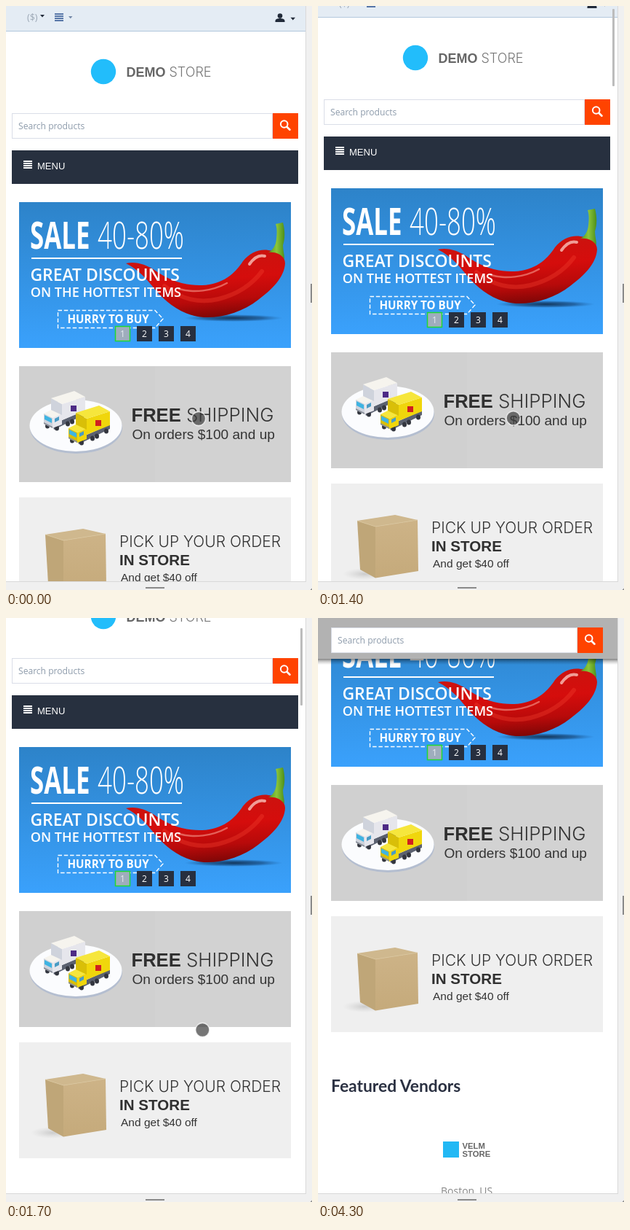
An HTML page for the animation above (6.1 s loop, 421 px wide and 801 px high).

```html
<!DOCTYPE html>
<html lang="en">
<head>
<meta charset="utf-8">
<title>Mobile store</title>
<style>
html, body { margin: 0; width: 100%; height: 100%; overflow: hidden; background: #f0f0f0; }
svg { display: block; width: 421px; height: 801px; }
text { white-space: pre; }
.open { font-family: "Open Sans", sans-serif; }
.arial { font-family: "Liberation Sans", Arial, sans-serif; }
.thin { font-family: Inter, sans-serif; font-weight: 300; }
.lato { font-family: Lato, sans-serif; }
.b { font-weight: 700; }
.sb { font-weight: 600; }
</style>
</head>
<body>
<svg viewBox="0 0 421 801">
  <defs>
    <clipPath id="screen"><rect width="412" height="789"/></clipPath>
    <clipPath id="pickClip"><rect x="18" y="674" width="374" height="159"/></clipPath>
    <linearGradient id="sky" x2="0" y2="1">
      <stop stop-color="#2d83c9"/><stop offset="1" stop-color="#3aa1fc"/>
    </linearGradient>
    <linearGradient id="red" x1=".4" y1="0" x2=".6" y2="1">
      <stop stop-color="#c9140f"/><stop offset=".45" stop-color="#d50d0c"/><stop offset=".75" stop-color="#b80a0a"/><stop offset="1" stop-color="#7c0606"/>
    </linearGradient>
    <linearGradient id="stem"><stop stop-color="#4f9a20"/><stop offset=".5" stop-color="#8cc63a"/><stop offset="1" stop-color="#4d8f1c"/></linearGradient>
    <linearGradient id="card" x2="0" y2="1"><stop stop-color="#cdb387"/><stop offset="1" stop-color="#c5aa7b"/></linearGradient>
    <radialGradient id="shade"><stop stop-color="#0c2440" stop-opacity=".85"/><stop offset=".6" stop-color="#123a66" stop-opacity=".55"/><stop offset="1" stop-color="#1b5c9c" stop-opacity="0"/></radialGradient>
    <radialGradient id="soft"><stop stop-color="#888" stop-opacity=".35"/><stop offset="1" stop-color="#aaa" stop-opacity="0"/></radialGradient>
    <linearGradient id="drop" x2="0" y2="1"><stop stop-color="#000" stop-opacity=".48"/><stop offset=".5" stop-color="#000" stop-opacity=".18"/><stop offset="1" stop-color="#000" stop-opacity="0"/></linearGradient>
  </defs>

  <rect width="421" height="801" fill="#f0f0f0"/>
  <rect width="413" height="790" fill="#d9d9d9"/>
  <rect width="412" height="789" fill="#fff"/>
  <g clip-path="url(#screen)">
    <g id="page">
      <!-- top bar -->
      <rect width="412" height="34" fill="#e4ecf4"/>
      <rect y="34" width="412" height="1" fill="#b3c8dd"/>
      <text class="open" x="29" y="20" font-size="12.5" fill="#9ba7b5">($)</text>
      <g id="topIcons"></g>
      <path d="M47 12h6l-3 3.5z M391.500 15.800h6.500l-3.250 3.600z" fill="#222b3a"/>
      <path d="M86 14h5.500l-2.750 3.200z" fill="#7388a8"/>
      <g fill="#222b3a"><circle cx="377" cy="13.600" r="3.300"/><path d="M370.500 22v-1.500c0-3 4-3.500 6.500-3.500s6.500.5 6.500 3.500v1.500z"/></g>
      <!-- logo -->
      <circle cx="134" cy="90" r="17.200" fill="#22bdfb"/>
      <text class="arial b" x="165.500" y="97" font-size="18" fill="#666">DEMO</text>
      <text class="thin" x="224.500" y="97" font-size="18" fill="#777">STORE</text>
      <g id="search"></g>
      <!-- menu -->
      <rect x="8" y="198" width="394" height="46" fill="#27303f"/>
      <g id="menuIcon"></g>
      <text class="arial" x="43" y="224" font-size="13" fill="#fff">MENU</text>
      <!-- sale -->
      <rect x="18" y="269" width="374" height="200" fill="url(#sky)"/>
      <ellipse cx="313" cy="428" rx="68" ry="5" fill="url(#shade)"/>
      <path d="M165 353C180 350 192 355 204 362C222 375 245 384 270 383C298 382 315 367 326 350C335 339 348 333 361 335C376 336 384 344 384 353C383 372 366 389 347 403C326 419 300 428 272 427C243 425 221 407 206 390C194 375 183 362 165 353Z" fill="url(#red)"/>
      <g fill="none" stroke-linecap="round">
        <path d="M218 384C240 402 266 408 292 402C320 395 340 380 352 364" stroke="#ee3a2c" stroke-width="6" opacity=".4"/>
        <path d="M335 354C342 344 349 341 356 343" stroke="#ffd8d0" stroke-width="4" opacity=".7"/>
        <path d="M238 388C258 394 284 391 304 380" stroke="#ffb5a8" stroke-width="2.500" opacity=".5"/>
      </g>
      <path d="M361 338C367 335 371 329 372 320C373 311 373 305 371 299L381 297C384 308 384 319 381 328C381 335 383 340 383 347C378 340 370 337 361 338Z" fill="url(#stem)"/>
      <g fill="#fff">
        <g transform="translate(33 333) scale(.67 1)" class="open" font-size="52">
          <text class="b">SALE</text><text x="139" font-weight="300">40-80%</text>
        </g>
        <rect x="35" y="345" width="207" height="2"/>
        <text class="open sb" x="33.500" y="377" font-size="22.900">GREAT DISCOUNTS</text>
        <text class="open sb" x="33.700" y="399" font-size="18.100">ON THE HOTTEST ITEMS</text>
        <text class="open b" x="84.500" y="435" font-size="15.200">HURRY TO BUY</text>
      </g>
      <path d="M71.500 417.500H205L216 429L205 441.500H71.500Z" fill="none" stroke="#fff" stroke-width="1.400" stroke-dasharray="5.500 2.800"/>
      <g id="pager"></g>
      <!-- shipping -->
      <rect x="18" y="494" width="374" height="159" fill="#d2d2d2"/>
      <rect x="18" y="494" width="187" height="159" fill="#d0d0d0"/>
      <ellipse cx="96.500" cy="578.500" rx="63.500" ry="35.500" fill="#b4bed0"/>
      <ellipse cx="96" cy="575.500" rx="63.500" ry="35.500" fill="#fbfcfe"/>
      <g id="trucks"></g>
      <text class="arial b" x="172.500" y="570" font-size="25.600" fill="#303030">FREE</text>
      <text class="thin" x="248" y="570" font-size="25.900" fill="#333">SHIPPING</text>
      <text class="arial" x="173.500" y="593.500" font-size="19.100" fill="#333">On orders $100 and up</text>
      <!-- pick up -->
      <rect x="18" y="674" width="374" height="159" fill="#efefef"/>
      <g clip-path="url(#pickClip)">
        <ellipse cx="64" cy="798" rx="30" ry="8" fill="url(#soft)"/>
        <path d="M54 725L106 717L137 724L79 733Z" fill="#cfb88e"/>
        <path d="M54 725L79 733L79 803.500L58 792Z" fill="#bfa678"/>
        <path d="M79 733L137 724L138 794L79 803.500Z" fill="url(#card)"/>
        <path d="M54 725L79 733L137 724" fill="none" stroke="#dac69e" stroke-width=".8"/>
      </g>
      <text class="thin" x="156" y="741.500" font-size="21" fill="#333">PICK UP YOUR ORDER</text>
      <text class="arial b" x="156" y="766.700" font-size="20.600" fill="#303030">IN STORE</text>
      <text class="arial" x="158" y="789" font-size="15.500" fill="#333">And get $40 off</text>
      <!-- vendors -->
      <text class="lato b" x="18" y="915" font-size="22.800" fill="#2b3142">Featured Vendors</text>
      <rect x="172" y="983" width="22" height="22" fill="#22b8f4"/>
      <g class="arial b" font-size="11.300" fill="#666"><text x="198.500" y="992.500">VELM</text><text x="198.500" y="1004">STORE</text></g>
      <text class="open" x="169" y="1055.500" font-size="14" fill="#888">Boston, US</text>
    </g>
    <g id="sticky">
      <rect y="56" width="412" height="8" fill="url(#drop)"/>
      <rect width="412" height="56" fill="#b2b2b2"/>
      <g id="stickySearch"></g>
    </g>
    <rect id="bar" x="405" width="3" height="106" rx="1" fill="#bcbcbc"/>
    <circle id="touch" r="9.600"/>
  </g>
  <g fill="#8a8a8a">
    <rect x="419" y="381" width="2" height="26"/>
    <rect x="192" y="797" width="26" height="2"/>
    <path d="M421 798.500V801H418.500Z"/>
  </g>
</svg>
<script>
const $ = id => document.getElementById(id);
const poly = (pts, fill) => `<polygon points="${pts}" fill="${fill}"/>`;
const rect = (x, y, w, h, attrs) => `<rect x="${x}" y="${y}" width="${w}" height="${h}" ${attrs}/>`;

const lines = (x, y, color) =>
  [0, 1, 2, 3].map(i => rect(x, y + i * 3, 12, 2, `fill="${color}"`)).join("");

const search = (x, y, w) =>
  rect(x + .5, y + .5, w - 36, 34, 'fill="#fff" stroke="#dadee8"') +
  `<text class="open" x="${x + 9}" y="${y + 21.5}" font-size="12.1" fill="#8d9bab">Search products</text>` +
  rect(x + w - 35, y, 35, 35, 'fill="#ff4300"') +
  `<g transform="translate(${x + w - 35} ${y})" fill="none" stroke="#fff" stroke-linecap="round">
   <circle cx="15.700" cy="15" r="4.800" stroke-width="2"/><path d="M19.500 18.800L23.500 22.700" stroke-width="2.600"/></g>`;

const pageButton = n => {
  const x = 120 + n * 30, on = n === 1;
  return (on ? rect(x + .5, 439.5, 20, 20, 'fill="#9fadbd" stroke="#20d832" stroke-width="1.5"')
             : rect(x, 439, 21, 21, 'fill="#272f3f"')) +
    `<text class="open" x="${x + 10.5}" y="454" font-size="12" text-anchor="middle" fill="${on ? "#e8edf2" : "#fff"}">${n}</text>`;
};

const truck = (x, y, c) => `<g transform="translate(${x} ${y})">` +
  poly("14,46 59,26 59,32 16,53", "#5b6170") +
  [[7, 48], [20, 51], [35, 45], [41, 42], [54, 35]].map(([a, b]) =>
    `<ellipse cx="${a}" cy="${b}" rx="3" ry="3.600" fill="#33363f"/>`).join("") +
  poly("2,31 14,25 27,31 14,37", c.top) +
  poly("2,31 14,37 14,51 2,45", c.front) +
  poly("14,37 27,31 27,46 14,51", c.side) +
  poly("3,33 13,38 13,44 3,39", "#3fb4e2") +
  poly("17,38 23,35 23,40 17,43", "#4a9cc4") +
  poly("2,43 14,49 14,51 2,45", "#8a8f9a") +
  poly("12,10 27,18 27,33 12,26", c.front) +
  poly("27,18 59,8 59,27 27,40", c.side) +
  poly("12,10 44,0 59,8 27,18", c.top) +
  rect(39, 20, 8, 8, `fill="${c.mark}"`) + "</g>";

$("topIcons").innerHTML = lines(67, 10, "#5877a8");
$("menuIcon").innerHTML = lines(24, 212, "#fff");
$("search").innerHTML = search(8, 147, 394);
$("stickySearch").innerHTML = search(18, 13, 374);
$("pager").innerHTML = [1, 2, 3, 4].map(pageButton).join("");
$("trucks").innerHTML =
  truck(50, 528, { top: "#f6f4ee", side: "#e6e6ec", front: "#cfd3dc", mark: "#4d2a86" }) +
  truck(84, 548, { top: "#f6e63c", side: "#f0d60c", front: "#d9bf08", mark: "#d01f1f" });

const LOOP = 6100;
// [start, value...]: the picture advances in held steps
const scrolls = [[0, 0], [1300, 4], [1400, 19], [1500, 43], [1600, 68], [1700, 92], [1800, 106], [3900, 265]];
const touches = [[0, 265, 566], [1200, 267, 565.5], [1400, 268.7, 565.3], [1500, 269.5, 565.2], [1600, 270.3, 565],
  [1800, 271.3, 564.2], [1900, 272.2, 563.4], [2100, 272.6, 563], [2300, 273.5, 562.3], [4100, 284, 558.5], [4200, 313, 548], [4300, -50, -50]];
const fades = [[0, 0], [1300, 1], [2100, .75], [2200, .4], [2300, .13], [3900, 0]];
const at = (keys, t) => keys.filter(k => k[0] <= t).pop();

function draw(t) {
  const y = at(scrolls, t)[1], [, cx, cy] = at(touches, t), held = t < 2100;
  $("page").setAttribute("transform", `translate(0 ${-y})`);
  $("sticky").setAttribute("visibility", t >= 3900 ? "visible" : "hidden");
  $("bar").setAttribute("y", Math.round(1.3 + y * .139));
  $("bar").setAttribute("opacity", at(fades, t)[1]);
  const dot = $("touch");
  dot.setAttribute("cx", cx);
  dot.setAttribute("cy", cy);
  dot.setAttribute("fill", `rgba(60,60,60,${held ? .7 : .58})`);
  dot.setAttribute("stroke", `rgba(255,255,255,${held ? .7 : .3})`);
  dot.setAttribute("stroke-width", held ? 1.6 : .8);
}

const start = performance.now();
function tick() {
  draw((performance.now() - start) % LOOP);
  requestAnimationFrame(tick);
}
draw(0);
requestAnimationFrame(tick);
</script>
</body>
</html>
```
